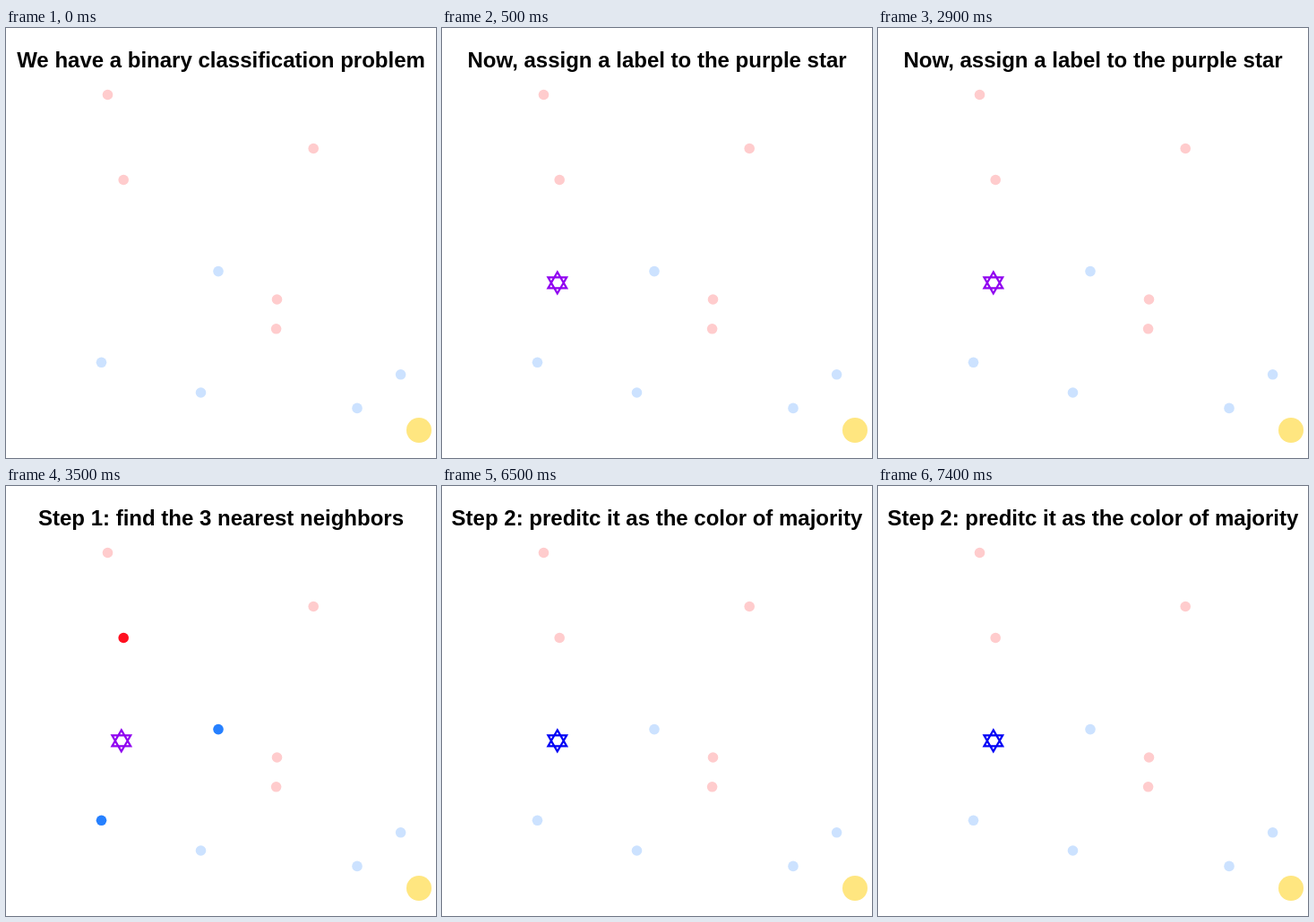
These frames come from a looping animation (480 px wide and 480 px high, 8000 ms). An HTML page:

```html
<!DOCTYPE html>
<html lang="en">
<head>
<meta charset="utf-8">
<title>Nearest neighbors</title>
<style>
  html, body { margin: 0; width: 100%; height: 100%; overflow: hidden; background: #fff; }
  svg { display: block; width: 480px; height: 480px; }
  text { font: bold 24px "Liberation Sans", Arial, sans-serif; text-anchor: middle; }
</style>
</head>
<body>
<svg viewBox="0 0 480 480">
  <text id="title" x="240" y="44"></text>
  <g id="dots"></g>
  <path id="star" fill="none" stroke-width="2.2"/>
  <circle cx="461" cy="449" r="14" fill="#ffe680"/>
</svg>
<script>
const LOOP = 8000;
const COLORS = {
  red: { pale: '#ffcccd', full: '#ff1020' },
  blue: { pale: '#cce2ff', full: '#2680ff' }
};

// x, y, class, is one of the nearest three
const POINTS = [
  [113.5, 74.5, 'red'], [343.2, 134.5, 'red'], [131.2, 169.5, 'red', true],
  [302.5, 303, 'red'], [301.6, 335.8, 'red'],
  [237, 271.6, 'blue', true], [106.5, 373.3, 'blue', true],
  [217.5, 407, 'blue'], [392, 424.4, 'blue'], [440.6, 386.8, 'blue']
];

const STEPS = [
  { at: 0, title: 'We have a binary classification problem', star: 'none' },
  { at: 500, title: 'Now, assign a label to the purple star', star: '#9000f0' },
  { at: 3500, title: 'Step 1: find the 3 nearest neighbors', star: '#9000f0', near: true },
  { at: 6500, title: 'Step 2: preditc it as the color of majority', star: '#0000f5' }
];

const byId = id => document.getElementById(id);
const title = byId('title'), star = byId('star');

const dots = POINTS.map(([cx, cy]) => {
  const dot = document.createElementNS('http://www.w3.org/2000/svg', 'circle');
  Object.entries({ cx, cy, r: 5.8 }).forEach(([k, v]) => dot.setAttribute(k, v));
  return byId('dots').appendChild(dot);
});

function triangle(cx, cy, r, turn) {
  const corners = [0, 1, 2].map(i => {
    const a = turn + i * Math.PI * 2 / 3;
    return (cx + r * Math.sin(a)).toFixed(2) + ' ' + (cy - r * Math.cos(a)).toFixed(2);
  });
  return 'M' + corners.join('L') + 'Z';
}
star.setAttribute('d', [0, Math.PI].map(turn => triangle(128.8, 284.4, 12, turn)).join(''));

let shown;
function show(step) {
  if (step === shown) return;
  shown = step;
  title.textContent = step.title;
  star.setAttribute('stroke', step.star);
  POINTS.forEach(([, , kind, near], i) => {
    dots[i].setAttribute('fill', COLORS[kind][step.near && near ? 'full' : 'pale']);
  });
}

const start = performance.now();
function tick() {
  const t = (performance.now() - start) % LOOP;
  show(STEPS.filter(s => s.at <= t).pop());
  requestAnimationFrame(tick);
}
tick();
</script>
</body>
</html>
```
